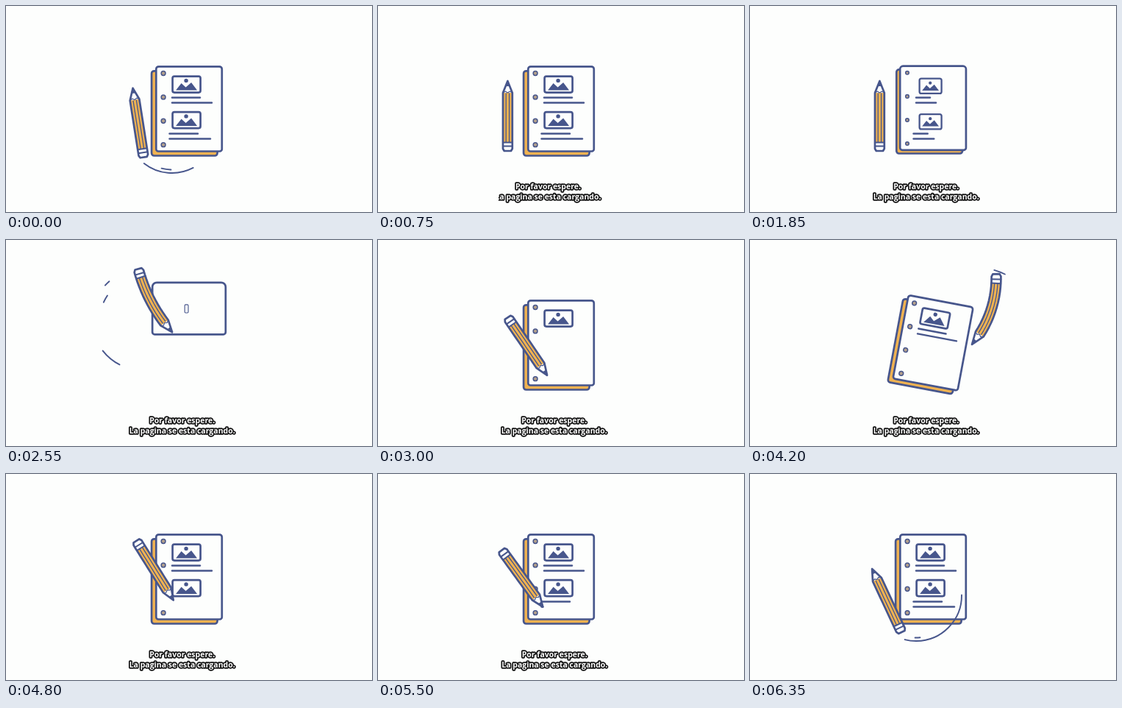
An HTML page with a canvas for the animation above (6400 ms loop, 498 px wide and 280 px high).

```html
<!DOCTYPE html>
<html lang="es">
<head>
<meta charset="utf-8">
<title>Cargando</title>
<style>
  html, body { margin: 0; width: 100%; height: 100%; overflow: hidden; background: #fdfefd; }
  canvas, svg { position: absolute; left: 0; top: 0; width: 498px; height: 280px; }
  text {
    font: bold 10.5px "Open Sans", "Noto Sans", sans-serif;
    text-anchor: middle; fill: #fff; stroke: #111; stroke-width: 3.4px;
    stroke-linejoin: round; paint-order: stroke;
  }
</style>
</head>
<body>
<canvas></canvas>
<svg viewBox="0 0 498 280">
  <clipPath id="box"><rect x="164" y="236" width="152" height="34"/></clipPath>
  <g clip-path="url(#box)">
    <g id="caption">
      <text x="239.7" y="249">Por favor espere.</text>
      <text x="239.7" y="263">La pagina se esta cargando.</text>
    </g>
  </g>
</svg>
<script>
const LOOP = 6400, STEP = 50, LEN = 95;
const NAVY = '#47568c', GOLD = '#f0b251', PAPER = '#fdfefd', RING = '#b3a08c';
const canvas = document.querySelector('canvas');
const caption = document.getElementById('caption');
const ctx = canvas.getContext('2d');
const dpr = window.devicePixelRatio || 1;
canvas.width = 498 * dpr;
canvas.height = 280 * dpr;

const rad = d => d * Math.PI / 180;
const lerp = (a, b, u) => a + (b - a) * u;
const progress = (t, a, b) => Math.min(1, Math.max(0, (t - a) / (b - a)));
const ease = u => u < .5 ? 4 * u ** 3 : 1 - 4 * (1 - u) ** 3;
const ramp = (t, a, b) => ease(progress(t, a, b));
const bump = u => Math.sin(Math.PI * u);

// A line is approached from time go, then drawn between from and to
const lines = [
  { y: 124.5, x: 226, end: 264, go: 2900, from: 3180, to: 3350 },
  { y: 131.5, x: 226, end: 280, go: 3350, from: 3430, to: 3650 },
  { y: 173.5, x: 222.5, end: 261, go: 4420, from: 4930, to: 5150 },
  { y: 180.5, x: 222.5, end: 278, go: 5250, from: 5450, to: 5700 }
];

// Poses are [tip x, tip y, angle]
const rest = [176.4, 102, 0];
const moves = [
  { from: 2080, to: 2500, pose: [226, 123, 152], bow: [14, -6] },
  { from: 2500, to: 2750, pose: [231, 197, 146], bend: 46 },
  { from: 3720, to: 4100, pose: [302, 142, 194], bow: [0, 10] },
  { from: 4100, to: 4300, pose: [302, 142, 204], bend: -42 },
  { from: 5962, to: 6522, pose: [176.4, 102, 360], bow: [-62, 50] },
  ...lines.flatMap(l => [
    { from: l.go, to: l.from, pose: [l.x, l.y, 144] },
    { from: l.from, to: l.to, pose: [l.end, l.y, 144] }
  ])
].sort((a, b) => a.from - b.from);

function pencilAt(t) {
  let pose = rest;
  for (const { from, to, pose: goal, bow = [0, 0], bend = 0 } of moves) {
    if (t < from) break;
    const u = progress(t, from, to), e = ease(u);
    if (u < 1) {
      const [x, y, angle] = pose.map((v, i) => lerp(v, goal[i], e));
      return [x + bow[0] * bump(e), y + bow[1] * bump(e), angle, bend * bump(u)];
    }
    pose = goal;
  }
  return pose;
}

// Speed arcs: centre, radius, swept angles, start and duration
const arcs = [
  { x: 186, y: 108, r: 69, a: 80, b: 146, start: 2250, time: 400 },
  { x: 186, y: 108, r: 58, a: 175, b: 215, start: 2330, time: 260 },
  { x: 186, y: 108, r: 69, a: 190, b: 229, start: 2350, time: 220 },
  { x: 302, y: 142, r: 105.5, a: 283, b: 300, start: 4130, time: 150 },
  { x: 226, y: 165, r: 62, a: -90, b: 135, start: 6186, time: 260 },
  { x: 226, y: 165, r: 57.5, a: 84, b: 110, start: 6330, time: 130 }
];

// Point on the pencil: s along it from the tip, w across
function onPencil([x, y, angle, bend = 0], s, w) {
  const stretch = 1 + (bend / 140) ** 2;
  const k = rad(bend || .01) / (LEN * stretch);
  const a = rad(angle - bend / 2), b = a + k * s * stretch;
  return [
    x + (Math.cos(b) - Math.cos(a)) / k + w * Math.cos(b),
    y + (Math.sin(b) - Math.sin(a)) / k + w * Math.sin(b)
  ];
}

function poly(points, fill, width, closed = true) {
  ctx.beginPath();
  points.forEach(p => ctx.lineTo(...p));
  if (closed) ctx.closePath();
  if (fill) { ctx.fillStyle = fill; ctx.fill(); }
  if (width) { ctx.lineWidth = width; ctx.stroke(); }
}

function box(x, y, w, h, r, fill, width) {
  ctx.beginPath();
  ctx.roundRect(x, y, w, h, r);
  ctx.fillStyle = fill;
  ctx.fill();
  ctx.lineWidth = width;
  ctx.stroke();
}

function dot(x, y, r, fill, width) {
  ctx.beginPath();
  ctx.arc(x, y, r, 0, 7);
  ctx.fillStyle = fill;
  ctx.fill();
  if (width) { ctx.lineWidth = width; ctx.stroke(); }
}

function drawPhoto(cx, cy, s) {
  if (s < .02) return;
  const w = 38 * s, h = 22 * Math.cbrt(s);
  box(cx - w / 2, cy - h / 2, w, h, Math.min(2.5, w / 4), PAPER, .9 + 1.8 * s);
  if (s < .2) return;
  ctx.save();
  ctx.translate(cx, cy);
  ctx.scale(s, s);
  poly([[-14.5, 8], [-7, -1.5], [-1, 4], [6.5, -2.5], [14.5, 8]], NAVY);
  dot(-.5, -5.2, 2.7, NAVY);
  ctx.restore();
}

function drawPage(t, tipX) {
  const flat = ramp(t, 1750, 2300) - ramp(t, 2500, 2750);
  const detail = 1 - ramp(t, 1700, 2100) + ramp(t, 2620, 2950);
  const x = lerp(204.3, 199, flat), y = lerp(82.3, 57, flat);
  const w = lerp(89.5, 100, flat), h = lerp(115.2, 69, flat);
  const corner = 6 - 2.5 * detail;

  ctx.save();
  ctx.translate(249.2, 140);
  ctx.rotate(rad(10.6 * bump(progress(t, 3900, 4500)) ** 2));
  ctx.translate(-249.2, -140);
  if (detail > .01) box(x - 6.2 * detail, y + 6 * detail, w, h, 3.5, GOLD, 2.7);
  box(x, y, w, h, [corner, corner, 3, 3], PAPER, 2.7);
  for (let i = 0; i < 4 && detail > .05; i++) {
    dot(x + 9.8, y + h * (.08 + .281 * i), 2.9 * detail, RING, 1.5);
  }
  for (let i = 0; i < 2; i++) {
    const pop = 2455 + 1965 * i;
    const size = 1 - ramp(t, 1700, 2100) + ramp(t, pop, pop + 300);
    drawPhoto(245.6, y + 24.3 + 48.5 * i + 13 * (1 - size), size);
  }
  for (const l of lines) {
    let end = lerp(l.end, l.x, ramp(t, 1700, 2000));
    if (t >= l.from) end = t < l.to ? tipX : l.end;
    if (end > l.x + .5) poly([[l.x, l.y], [end, l.y]], null, 2.4, false);
  }
  ctx.restore();
}

function drawPencil(pose) {
  const at = (s, w) => onPencil(pose, s, w);
  const side = (a, b, w) => Array.from({ length: 13 }, (_, i) => at(lerp(a, b, i / 12), w));
  const outline = [at(0, 0), ...side(16, 92, -6.4), at(LEN, -4.6), at(LEN, 4.6), ...side(92, 16, 6.4)];
  poly(outline, PAPER);
  poly([...side(16, 83, -6.4), ...side(83, 16, 6.4)], GOLD);
  for (const w of [-2.2, 2.2]) poly(side(17, 83, w), null, 1.3, false);
  poly([at(16, -6.4), at(14, -3), at(16, 0), at(14, 3), at(16, 6.4)], null, 1.2, false);
  poly([at(0, 0), at(7, -2.8), at(7, 2.8)], NAVY);
  for (const s of [83.5, 88.5]) poly([at(s, -6.4), at(s, 6.4)], null, 2, false);
  poly(outline, null, 2.7);
}

// The head of each arc slows down while its tail catches up
function drawArcs(t) {
  ctx.lineWidth = 1.9;
  for (const { x, y, r, a, b, start, time } of arcs) {
    const u = progress(t, start, start + time);
    if (u === 0 || u === 1) continue;
    ctx.beginPath();
    ctx.arc(x, y, r, rad(lerp(a, b, u * u)), rad(lerp(a, b, 1 - (1 - u) ** 2)));
    ctx.stroke();
  }
}

// Slides in from the left and out to the right
function captionShift(t) {
  const before = 1 - progress(t, 0, 1450), after = progress(t, 5250, 6250);
  return 152 * (after ** 4 - before ** 4);
}

function draw(now) {
  const t = Math.floor((now % LOOP) / STEP) * STEP;
  // The last swing runs on past the loop point
  const scene = t < 200 ? t + LOOP : t;
  const pose = pencilAt(scene);
  ctx.setTransform(dpr, 0, 0, dpr, 0, 0);
  ctx.fillStyle = PAPER;
  ctx.fillRect(0, 0, 498, 280);
  ctx.strokeStyle = NAVY;
  ctx.lineCap = ctx.lineJoin = 'round';
  drawPage(scene, pose[0]);
  drawArcs(scene);
  drawPencil(pose);
  caption.setAttribute('transform', `translate(${captionShift(t).toFixed(2)} 0)`);
}

function tick() {
  draw(performance.now());
  requestAnimationFrame(tick);
}
tick();
</script>
</body>
</html>
```
